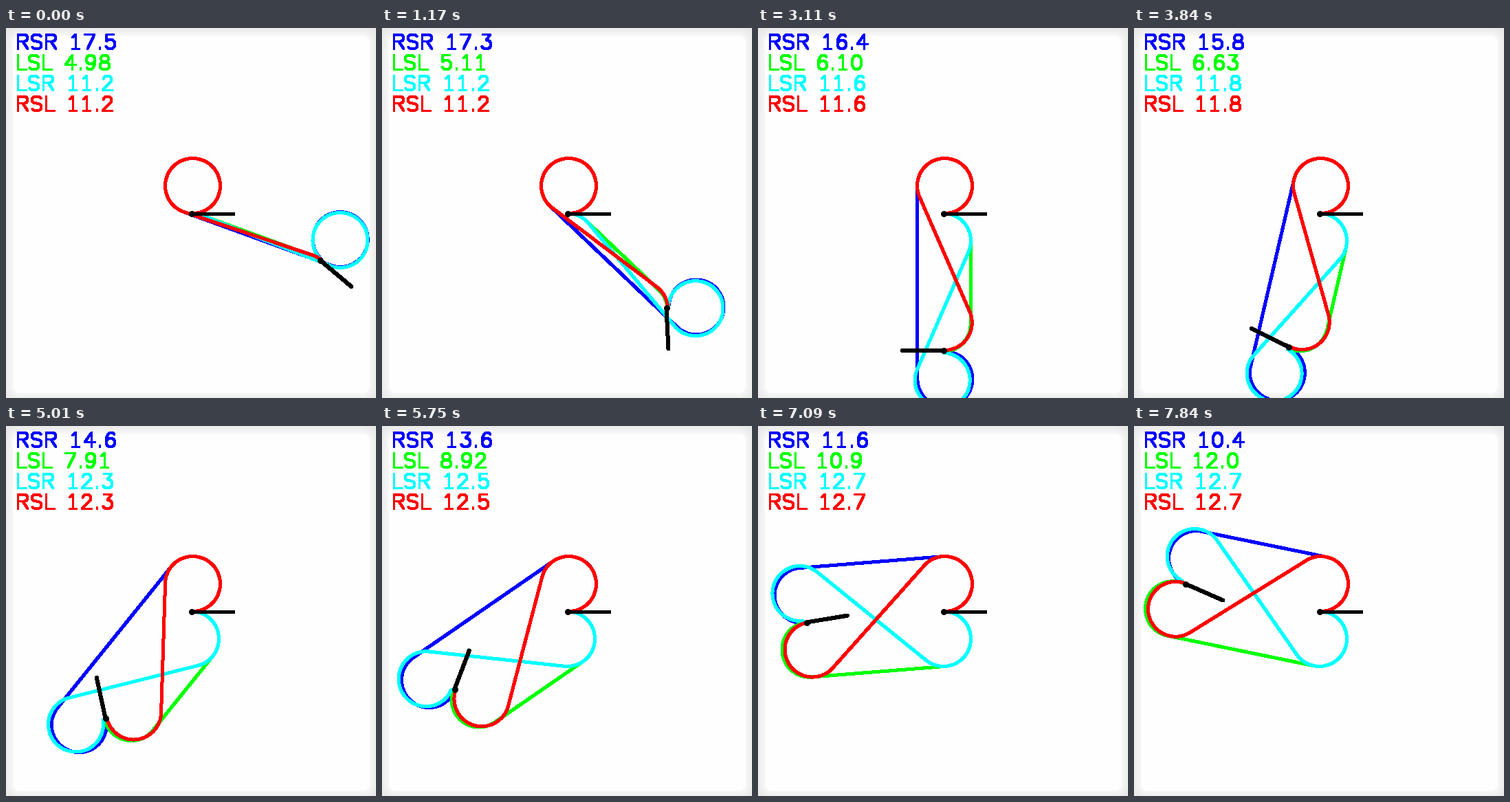
Recreate the animation shown at these times as a matplotlib script. Size 538 by 538 pixels, loop 7990 ms.

```python
import numpy as np
import matplotlib.pyplot as plt
from matplotlib.animation import FuncAnimation

SIZE, DPI = 538, 64
FRAMES, LOOP_MS = 54, 7990
MID = 269           # start pose, in pixels
UNIT = 40           # pixels per turning radius
ORBIT = 200
STEP = 2            # sampling step of a path, in pixels
TAU = 2 * np.pi

PLANS = {"RSR": "#0000ff", "LSL": "#00ff00", "LSR": "#00ffff", "RSL": "#ff0000"}

# orbit angle (radians) at a few frames
KEYS = [0, 8, 16, 26, 34, 43, 53]
ANGLES = [0.35, 0.82, 1.275, 1.858, 2.305, 2.83, 3.405]


# ---------- stroke lettering ----------

def arc(cx, cy, rx, ry, a0, a1):
    a = np.radians(np.linspace(a0, a1, 24))
    return np.column_stack([cx + rx * np.cos(a), cy + ry * np.sin(a)])


def stroke(*parts):
    return np.vstack([np.atleast_2d(p) for p in parts]).astype(float)


SIX = [arc(10.5, 6.5, 6.5, 6.5, 0, 360), arc(11.5, 8, 7.5, 13, 55, 180)]

# character: (advance, strokes), cap height 21
GLYPHS = {
    " ": (16, []),
    ".": (10, [stroke((5, 1.5), (5, 0.5))]),
    "R": (21, [stroke((4, 0), (4, 21), arc(13, 16, 5, 5, 90, -90), (4, 11)),
               stroke((11, 11), (18, 0))]),
    "S": (20, [stroke(arc(10, 16, 7, 5, 30, 270), arc(10, 5.5, 7, 5.5, 90, -150))]),
    "L": (17, [stroke((4, 21), (4, 0), (16, 0))]),
    "0": (20, [arc(10, 10.5, 7, 10.5, 0, 360)]),
    "1": (20, [stroke((5, 17), (7, 18), (10, 21), (10, 0)), stroke((5, 0), (15, 0))]),
    "2": (20, [stroke(arc(10, 15.5, 6, 5.5, 170, -35), (3, 0), (17, 0))]),
    "3": (20, [stroke((5, 21), (16, 21), (10, 13), arc(10, 6.5, 7, 6.5, 90, -150))]),
    "4": (20, [stroke((13, 0), (13, 21), (3, 7), (18, 7))]),
    "5": (20, [stroke((15, 21), (5, 21), arc(10, 7, 7, 7, 140, -150))]),
    "6": (20, SIX),
    "7": (20, [stroke((3, 21), (17, 21), (7, 0))]),
    "8": (20, [arc(10, 16, 5.5, 5, 0, 360), arc(10, 5.5, 7, 5.5, 0, 360)]),
    "9": (20, [(20, 21) - s for s in SIX]),
}


def letter(text, x, y):
    """One polyline for the whole string, strokes parted by NaN."""
    pts = []
    for ch in text:
        advance, strokes = GLYPHS[ch]
        for s in strokes:
            pts += [np.column_stack([x + s[:, 0], y - s[:, 1]]), [[np.nan, np.nan]]]
        x += advance
    return np.vstack(pts)


# ---------- shortest curved paths ----------

def along(h):
    return np.array([np.cos(h), np.sin(h)])


def normal(h):
    return np.array([-np.sin(h), np.cos(h)])


def solve(kind, goal, heading):
    """First turn, straight length, last turn; all in turning radii."""
    s1, s2 = (1 if kind[i] == "L" else -1 for i in (0, 2))
    gap = goal + s2 * normal(heading) - s1 * normal(0)
    dist, direction = np.hypot(*gap), np.arctan2(gap[1], gap[0])
    if s1 != s2:
        direction += s1 * np.arcsin(min(1, 2 / dist))
        dist = np.sqrt(max(0, dist ** 2 - 4))
    return s1 * direction % TAU, dist, s2 * (heading - direction) % TAU


def turn(pos, h, sweep, side):
    # right turns lag by half a step
    lag = STEP / UNIT if side < 0 else 0
    centre = pos + UNIT * side * normal(h + lag)
    a = h + side * np.linspace(0, sweep, 2 + int(sweep * 20)) + lag
    return centre - UNIT * side * normal(a).T


def trace(kind, first, straight, last):
    s1, s2 = (1 if kind[i] == "L" else -1 for i in (0, 2))
    head = turn(np.array([MID, MID]), 0, first, s1)
    h = s1 * first
    joint = head[-1] + (straight * UNIT + STEP) * along(h)
    return np.vstack([head, turn(joint, h, last, s2)])


# ---------- stage ----------

def backdrop():
    y, x = np.mgrid[0:SIZE, 0:SIZE]
    qx = np.abs(x - 269) - 249
    qy = np.abs(y - 270.5) - 249.5
    d = np.hypot(np.maximum(qx, 0), np.maximum(qy, 0)) - 10
    shade = np.interp(d, [-0.5, 1, 10, 16], [254, 247, 236, 231])
    return np.repeat((shade / 255)[..., None], 3, axis=2)


fig = plt.figure(figsize=(SIZE / DPI, SIZE / DPI), dpi=DPI)
ax = fig.add_axes([0, 0, 1, 1])
ax.imshow(backdrop(), interpolation="nearest", aspect="auto")
ax.set_xlim(-0.5, SIZE - 0.5)
ax.set_ylim(SIZE - 0.5, -0.5)
ax.axis("off")


def pen(color, width, z):
    line, = ax.plot([], [], color=color, lw=width * 72 / DPI, zorder=z,
                    antialiased=False, solid_capstyle="round",
                    solid_joinstyle="round")
    return line


def pose_marks():
    dot, = ax.plot([], [], "o", color="black", ms=9 * 72 / DPI, mew=0,
                   zorder=9, antialiased=False)
    return pen("black", 5, 9), dot


def set_pose(marks, pos, heading):
    stick, dot = marks
    tip = pos + 60 * along(heading)
    stick.set_data([pos[0], tip[0]], [pos[1], tip[1]])
    dot.set_data([pos[0]], [pos[1]])


curves = {k: pen(c, 4, 2 + i) for i, (k, c) in enumerate(PLANS.items())}
labels = {k: pen(c, 3, 8) for k, c in PLANS.items()}
start, end = pose_marks(), pose_marks()
set_pose(start, np.array([MID, MID]), 0)


def draw(frame):
    angle = np.interp(frame, KEYS, ANGLES)
    heading = 2 * angle
    offset = np.trunc(ORBIT * along(angle))
    for row, kind in enumerate(PLANS):
        parts = solve(kind, offset / UNIT, heading)
        curves[kind].set_data(*trace(kind, *parts).T)
        text = f"{kind} {f'{sum(parts):.6f}'[:4]}"
        labels[kind].set_data(*letter(text, 13, 30 + 30 * row).T)
    set_pose(end, MID + offset, heading)
    return [*curves.values(), *labels.values(), *end]


anim = FuncAnimation(fig, draw, frames=FRAMES, interval=LOOP_MS / FRAMES,
                     repeat=True, repeat_delay=0, blit=False)
plt.show()
```
